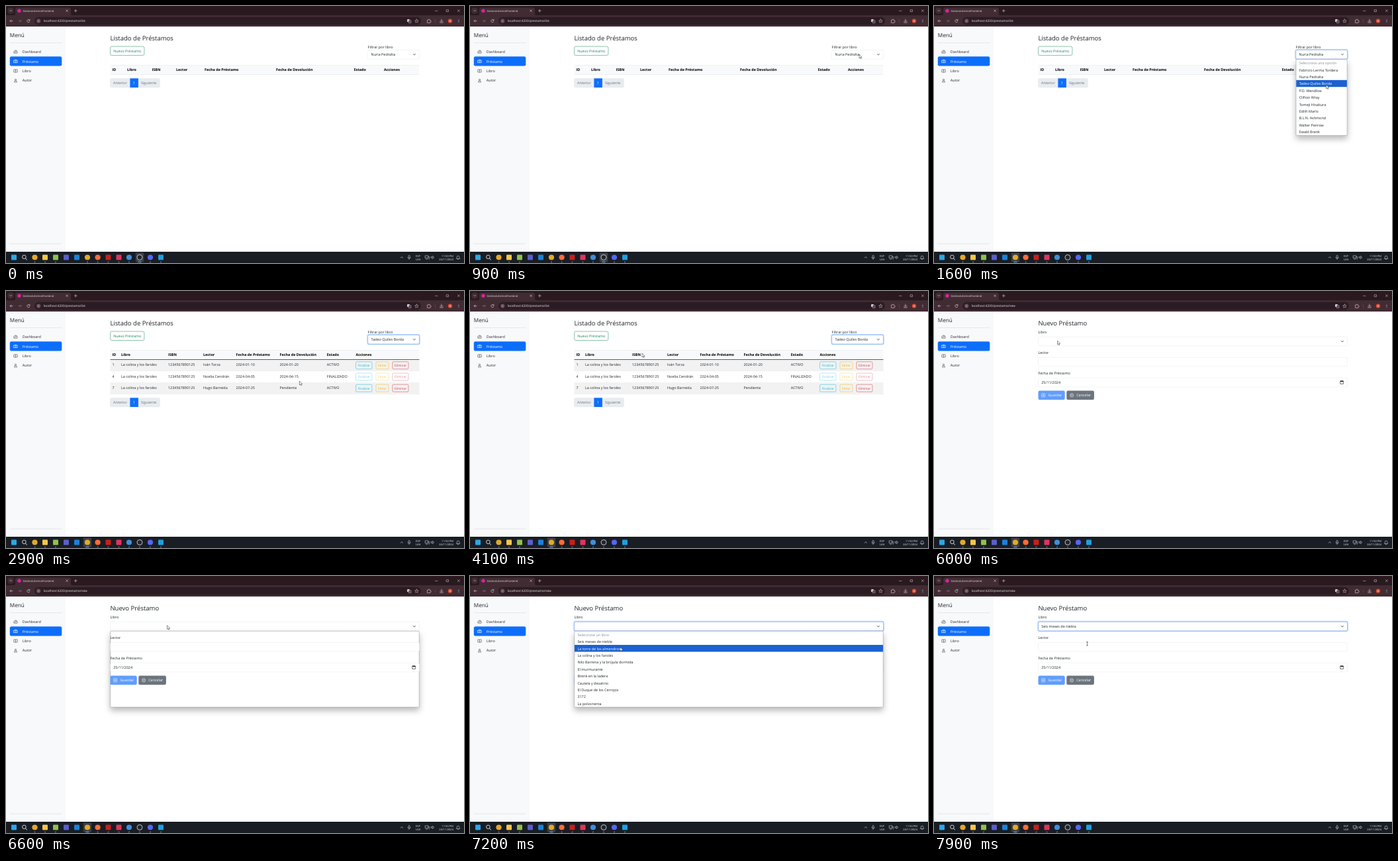
Recreate the animation shown at these times as an HTML page. Size 692x388 px, loop 8 s.

```html
<!DOCTYPE html>
<html lang="es">
<head>
<meta charset="utf-8">
<title>Préstamos</title>
<style>
html, body { margin: 0; width: 100%; height: 100%; overflow: hidden; background: #fff; }
svg { display: block; width: 100vw; height: 100vh; }
text { font-family: "Open Sans", "Noto Sans", sans-serif; text-rendering: geometricPrecision; white-space: pre; }
.shadow { filter: drop-shadow(0 5px 5px rgba(0, 0, 0, .28)); }
</style>
</head>
<body>
<svg id="stage" viewBox="0 0 692 388" xmlns="http://www.w3.org/2000/svg"></svg>
<script>
const LOOP = 8000, STEP = 100, ROW = 10.4;
const INK = '#212529', BLUE = '#0d6efd', GREY = '#6c757d', LINE = '#dee2e6', GREEN = '#198754';

// Pointer path: time, x, y
const PATH = [
  [0, 204, 392], [100, 204, 392], [900, 588, 73], [1100, 588, 73], [1600, 592.5, 119],
  [1900, 592.5, 119], [2700, 443.5, 136], [2900, 443.5, 136], [3700, 330, 118],
  [4500, 190, 70], [5100, 186.5, 73], [5600, 186.5, 73], [6000, 186.5, 75],
  [6100, 186.5, 75], [6600, 243.5, 74.5], [6700, 243.5, 74.5], [7000, 235, 117],
  [7200, 227, 107.5], [7700, 231.5, 102.3], [8000, 231.5, 102.3]
];

const AUTHORS = ['Selecciona una opción', 'Fabricio Lerma Tordera', 'Nuria Pedralta', 'Tadeo Quiles Borda',
  'P.D. Wendlow', 'Clifton Wray', 'Tomeji Hisakura', 'Edith Marlo', 'B.L.N. Ashmond', 'Walter Penrow', 'Ewald Brenk'];
const BOOKS = ['Seleccione un libro', 'Seis meses de niebla', 'La torre de los almendros', 'La colina y los faroles',
  'Nilo Barrena y la brújula dormida', 'El murmurante', 'Brenk en la ladera', 'Cautela y desatino',
  'El Duque de los Cerrojos', '3172', 'La polvorienta'];
const HEAD = ['ID', 'Libro', 'ISBN', 'Lector', 'Fecha de Préstamo', 'Fecha de Devolución', 'Estado', 'Acciones'];
const COLS_EMPTY = [160.5, 183, 220.5, 257, 300, 408, 525.7, 571];
const COLS_FULL = [160.5, 174, 245, 298, 347.6, 413.5, 484.8, 528.5];
const LOANS = [
  ['1', 'Iván Torza', '2024-01-10', '2024-01-20', 'ACTIVO'],
  ['4', 'Noelia Cendrán', '2024-04-05', '2024-04-15', 'FINALIZADO'],
  ['7', 'Hugo Barreida', '2024-07-25', 'Pendiente', 'ACTIVO']
];

const text = (x, y, s, { size = 5.45, fill = INK, weight = 400, anchor = 'start', id = '' } = {}) =>
  `<text ${id && `id="${id}"`} x="${x}" y="${y}" font-size="${size}" fill="${fill}" font-weight="${weight}" text-anchor="${anchor}">${s}</text>`;
const rect = (x, y, w, h, fill, more = '') =>
  `<rect x="${x}" y="${y}" width="${w}" height="${h}" fill="${fill}" ${more}/>`;
const disc = (x, y, r, fill, more = '') => `<circle cx="${x}" cy="${y}" r="${r}" fill="${fill}" ${more}/>`;
const path = (d, color, w = .6, more = '') =>
  `<path d="${d}" fill="none" stroke="${color}" stroke-width="${w}" stroke-linecap="round" stroke-linejoin="round" ${more}/>`;
const at = (x, y, s) => `<g transform="translate(${x} ${y})">${s}</g>`;
const group = (id, s) => `<g id="${id}">${s}</g>`;
const edge = (color, r = 2.2, w = .4) => `rx="${r}" stroke="${color}" stroke-width="${w}"`;

const chevron = (x, y) => path(`M${x - 1.7} ${y - .8}l1.7 1.7 1.7-1.7`, '#343a40', .75);
const field = (x, y, w) => rect(x, y, w, 13.6, '#fff', edge(LINE));
const focusRing = (id, x, y, w) => group(id,
  rect(x - .7, y - .7, w + 1.4, 15, 'none', edge('#b6d4fe', 2.8, 1.3)) + rect(x, y, w, 13.6, 'none', edge('#6ea3f5', 2.2, .5)));

function browser() {
  const c = '#e3d5da';
  const line = (d, w) => path(d, c, w);
  return rect(0, 0, 692, 14, '#2a1a20') + rect(0, 14, 692, 17, '#412c34') +
    rect(2.5, 2.5, 9, 9, '#412c34', 'rx="3"') + line('M5.8 6.4l1.4 1.4 1.4-1.4') +
    '<path d="M11.5 14.1q2.5 0 2.5-2.5v-6q0-3 3-3h78q3 0 3 3v6q0 2.5 2.5 2.5z" fill="#412c34"/>' +
    disc(20, 7.2, 2.7, '#d6249f') +
    text(25.5, 8.9, 'GestionLibreriaFrontend', { size: 4.1, fill: '#eee3e7' }) +
    line('M90.8 5.9l2.6 2.6m0-2.6l-2.6 2.6M103.3 7.2h3.8m-1.9-1.9v3.8') +
    line('M648.6 7.4h3.4M665.6 5.7h2.9v2.9h-2.9zM682.4 5.7l3 3m0-3l-3 3', .5) +
    line('M10.2 22.6H6.1m1.8-1.8l-1.8 1.8 1.8 1.8') + path('M18.9 22.6H23m-1.8-1.8l1.8 1.8-1.8 1.8', '#8f7a82') +
    line('M35.6 21.4a2.1 2.1 0 1 0 .3 1.9M35.9 20.2v1.5h-1.5') +
    rect(43, 16.7, 584, 11.8, '#2a1c22', 'rx="5.9"') + disc(49.2, 22.6, 4, '#412c34') +
    disc(49.2, 22.6, 1.9, 'none', `stroke="${c}" stroke-width=".5"`) + line('M49.2 22.4v1.1M49.2 21.5v.05', .5) +
    text(56.6, 24.3, 'localhost:4200/prestamo/list', { size: 4.77, fill: '#f1e8eb', id: 'url' }) +
    rect(606.2, 19.9, 3.6, 4.2, c, 'rx=".5"') + rect(608.3, 21.6, 3.8, 4.2, '#2a1c22', `stroke="${c}" stroke-width=".45" rx=".5"`) +
    line('M609.2 24.6l1-2 1 2', .4) +
    line('M620.5 20l.8 1.8 1.9.2-1.4 1.3.4 1.9-1.7-1-1.7 1 .4-1.9-1.4-1.3 1.9-.2z', .5) +
    line('M636.9 21.2h1.2q0-1.2.9-1.2t.9 1.2h1.2v1.3q1.2 0 1.2.9t-1.2.9v1.1h-4.2z') +
    rect(648.6, 20, .4, 5.2, '#7d636d') +
    line('M658 20v3.4m-1.5-1.5l1.5 1.5 1.5-1.5M655.8 23.8v1.3h4.4v-1.3') +
    disc(671, 22.6, 3.2, '#e5492f') + text(671, 24, 'B', { size: 3.6, fill: '#fff', anchor: 'middle' }) +
    [20.9, 22.6, 24.3].map(y => disc(684, y, .5, c)).join('');
}

function sidebar() {
  const gauge = c => path('M-2.6 1.6a2.8 2.8 0 1 1 5.2 0zM0 .5l1.3-1.6M-1.7.3h.3M0-1.3v.2', c, .55);
  const box = c => path('M-2.7-1.5h5.4v3.4h-5.4zM-1.5-1.5l.5-.9h2l.5.9', c, .6) + disc(0, .2, .9, 'none', `stroke="${c}" stroke-width=".5"`);
  const book = c => path('M0-1.7q-1.4-.9-2.7-.3v4q1.3-.6 2.7.2 1.4-.8 2.7-.2v-4q-1.3-.6-2.7.3zv3.8', c, .5);
  const person = c => disc(0, -1.1, 1.1, 'none', `stroke="${c}" stroke-width=".5"`) + path('M-2 2.2q0-1.9 2-1.9t2 1.9z', c, .5);
  const items = [['Dashboard', gauge], ['Préstamo', box], ['Libro', book], ['Autor', person]];
  return rect(0, 31, 90, 340, '#f8f9fa') + text(5.8, 47, 'Menú', { size: 8.17 }) +
    rect(5.8, 55.3, 78.5, .4, '#c6c9cc') + rect(5.8, 358.8, 78.5, .4, '#c6c9cc') +
    rect(5.8, 76.2, 78.5, 14.3, BLUE, 'rx="2.2"') +
    items.map(([name, icon], i) => {
      const y = 69.2 + i * 14.4, c = i === 1 ? '#fff' : INK;
      return at(14.5, y, icon(c)) + text(24.8, y + 1.9, name, { fill: c });
    }).join('');
}

function taskbar() {
  const c = '#e8eaed', mid = 379.5;
  const sq = (x, fill) => rect(x - 4, mid - 4, 8, 8, fill, 'rx="1"');
  const dot = (x, fill) => disc(x, mid, 4.1, fill);
  const open = [43.5, 59, 75, 123, 138.6, 154.5, 170.5, 186, 202, 218, 234];
  const tile = (id, x) => group(id, rect(x - 6.2, 372.4, 12.4, 14.2, '#3a3f47', 'rx="1.4"') + rect(x - 2.6, 386, 5.2, 1, '#66c5f2', 'rx=".5"'));
  return rect(0, 371, 692, 17, '#191d24') + tile('tileA', 202) + tile('tileB', 123) +
    open.map(x => rect(x - 1, 386.1, 2, .8, '#9aa0a8', 'rx=".4"')).join('') +
    sq(12, '#2aa8ea') +
    disc(27.4, 378.9, 2.8, 'none', `stroke="${c}" stroke-width=".9"`) + path('M29.6 381.2l2 2', c, 1) +
    dot(43.5, '#e3a92c') + sq(59, '#f4c84a') + sq(75, '#8fc24a') + sq(91, '#5b5fc7') + sq(107, '#1b82d6') +
    dot(123, '#e3a92c') + dot(138.6, '#ff6c37') + sq(154.5, '#c8201c') + sq(170.5, '#e0355c') +
    dot(186, '#3f8fdc') + disc(202, mid, 4, '#22252b', `stroke="${c}" stroke-width=".8"`) +
    dot(218, '#5865f2') + sq(234, '#1f9fe0') +
    path('M596.2 380.3l1.7-1.7 1.7 1.7', c) +
    rect(608.1, 376.4, 2, 3.8, 'none', edge(c, 1, .5)) + path('M607 379.3q0 2.1 2.1 2.1t2.1-2.1M609.1 381.4v1.3', c, .5) +
    ['ESP', 'LAA'].map((s, i) => text(622.6, 378.6 + i * 5.5, s, { size: 4.1, fill: c, anchor: 'middle' })).join('') +
    path('M633.6 377h4.4v3.6h-4.4zM634.6 382.3h2.4M638 378.6h1.4v3.6', c, .55) +
    path('M642.4 378.6h1l1.4-1.3v4.4l-1.4-1.3h-1zM646 378.4q.8 1.1 0 2.2', c, .5) +
    text(676, 378.6, '11:50 PM', { size: 4.1, fill: c, anchor: 'end' }) +
    text(676, 384.1, '24/11/2024', { size: 4.1, fill: c, anchor: 'end' }) +
    path('M680.6 381.3q.8-.7.8-2.4 0-1.8 1.7-1.8t1.7 1.8q0 1.7.8 2.4zM682.5 382.6h1.2', c, .55);
}

function menu(id, x, y, w, items) {
  return group(id, rect(x, y, w, 114.8, '#fff', `class="shadow" ${edge('#8b8f94', 1, .5)}`) +
    rect(x + .3, y, w - .6, ROW, '#1b62d2', `id="${id}Bar"`) +
    items.map((s, i) => text(x + 4.7, y + 7.6 + i * ROW, s, { id: id + i, fill: i ? INK : '#868b90' })).join(''));
}

function head(cols, divider) {
  return rect(157.5, 89.4, 467, 14.2, '#f8f9fa') + rect(157.5, 89.2, 467, .4, LINE) +
    HEAD.map((s, i) => text(cols[i], 98.3, s, { weight: 700, fill: '#000' })).join('') +
    rect(157.5, 103.2, 467, divider ? .8 : .5, divider ? INK : LINE);
}

function pager(y) {
  return rect(157.5, y, 75, 13.6, '#e9ecef', edge(LINE)) + rect(187.4, y - .1, 12.5, 13.8, BLUE) +
    text(162, y + 8.8, 'Anterior', { fill: GREY }) + text(193.6, y + 8.8, '1', { fill: '#fff', anchor: 'middle' }) +
    text(204, y + 8.8, 'Siguiente', { fill: GREY });
}

function loanRow([id, reader, from, to, state], i) {
  const y = 103.9 + i * 17.2, base = y + 9.4;
  const cells = [id, 'La colina y los faroles', '1234567890125', reader, from, to, state];
  const button = (x, w, s, color) => rect(x, y + 2.9, w, 11, 'none', edge(color, 1.5, .5)) +
    text(x + w / 2, y + 10.2, s, { size: 4.77, fill: color, anchor: 'middle' });
  return rect(157.5, y, 467, 17.2, i % 2 ? '#fff' : '#f2f2f2') + rect(157.5, y + 17, 467, .4, LINE) +
    cells.map((s, k) => text(COLS_FULL[k], base, s)).join('') +
    `<g opacity="${i === 1 ? .6 : 1}">` + button(528.6, 24.4, 'Finalizar', '#0dbbe0') +
    button(559, 19, 'Editar', '#f5b90a') + button(584, 24, 'Eliminar', '#dc3545') + '</g>';
}

const title = s => text(157.4, 52.4, s, { size: 9.54, weight: 500 });

const listPage = () => title('Listado de Préstamos') +
  rect(157.6, 61, 51.3, 13.5, '#fff', `id="newBtn" ${edge(GREEN, 2.2, .5)}`) +
  text(162.2, 69.7, 'Nuevo Préstamo', { fill: GREEN, id: 'newText' }) +
  text(546.6, 64.4, 'Filtrar por libro') + field(546.7, 66.4, 77.8) + focusRing('ringA', 546.7, 66.4, 77.8) +
  text(551.6, 75.2, '', { id: 'author' }) + chevron(617, 73.2) +
  group('empty', head(COLS_EMPTY, false) + pager(109.4)) +
  group('full', head(COLS_FULL, true) + LOANS.map(loanRow).join('') + pager(161.4)) +
  menu('menuA', 547, 80.6, 77.2, AUTHORS);

const newPage = () => title('Nuevo Préstamo') + text(157.4, 64.4, 'Libro') +
  field(157.6, 69.2, 467) + focusRing('ringB', 157.6, 69.2, 467) + text(162.2, 78, '', { id: 'book' }) + chevron(617, 76.1) +
  rect(157.7, 83.2, 466.6, 114.8, '#fff', `id="frame" class="shadow" ${edge('#8b8f94', 1, .5)}`) +
  text(157.4, 95.3, 'Lector') + field(157.6, 100.3, 467) +
  text(157.4, 126.2, 'Fecha de Préstamo') + field(157.6, 131.2, 467) + text(162.2, 139.9, '25/11/2024') +
  path('M614.2 136h4.2v4.3h-4.2zM615.1 135.3v.5M617.5 135.3v.5', '#111', .6) + rect(614.2, 135.8, 4.2, 1.2, '#111') +
  rect(157.5, 150.6, 40.2, 13.6, '#619dfd', 'rx="2.2"') + rect(200.3, 150.6, 41.6, 13.6, GREY, 'rx="2.2"') +
  rect(162.6, 154.8, 5.2, 5.2, 'none', edge('#fff', .8, .55)) + path('M165.2 156v2.8M163.8 157.4h2.8', '#fff', .55) +
  disc(208.1, 157.4, 2.6, 'none', 'stroke="#fff" stroke-width=".55"') + path('M207.1 156.4l2 2m0-2l-2 2', '#fff', .55) +
  text(172.4, 159.3, 'Guardar', { fill: '#fff' }) + text(215.2, 159.3, 'Cancelar', { fill: '#fff' }) +
  menu('menuB', 157.7, 83.2, 466.6, BOOKS);

const pointer = () => group('pointer',
  group('arrow', '<path d="M0 0v5.9l1.4-1.3.9 2.1.9-.4-.9-2h1.9z" fill="#fff" stroke="#111" stroke-width=".45" stroke-linejoin="round"/>') +
  group('hand', '<path d="M-.6.3q.6-.8 1.2 0v2.6l2.3.6q.8.3.7 1.2l-.6 2.8h-3.4l-2-2.9q-.2-1 .7-.7l1.1.8z" fill="#fff" stroke="#111" stroke-width=".45" stroke-linejoin="round"/>') +
  group('beam', path('M-1-2.8h.7q.3 0 .3.4v4.8q0 .4-.3.4H-1M1-2.8H.3q-.3 0-.3.4M1 2.8H.3q-.3 0-.3-.4', '#111', .5)));

const $ = id => document.getElementById(id);
$('stage').innerHTML = rect(0, 0, 692, 388, '#fff') + sidebar() + group('list', listPage()) +
  group('form', newPage()) + browser() + taskbar() + pointer();

const show = (id, on) => $(id).style.display = on ? '' : 'none';
const put = (id, s) => { if ($(id).textContent !== s) $(id).textContent = s; };

function pointerAt(t) {
  const i = Math.max(1, PATH.findIndex(p => p[0] > t));
  const [t0, x0, y0] = PATH[i - 1], [t1, x1, y1] = PATH[i];
  const k = (t - t0) / (t1 - t0), e = k * k * (3 - 2 * k);
  return [x0 + (x1 - x0) * e, y0 + (y1 - y0) * e];
}

function hover(id, top, y, idle, count) {
  const n = y < top ? idle : Math.floor((y - top) / ROW);
  show(id + 'Bar', n > 0);
  $(id + 'Bar').setAttribute('y', top + n * ROW);
  for (let i = 1; i < count; i++) $(id + i).setAttribute('fill', i === n ? '#fff' : INK);
}

function draw(ms) {
  const t = Math.floor(ms % LOOP / STEP) * STEP;
  const [x, y] = pointerAt(t);
  const form = t >= 5600, picked = t >= 1900, done = t >= 7900;
  const over = !form && x > 157 && x < 209 && y > 61 && y < 74.5;

  show('list', !form);
  show('form', form);
  put('url', 'localhost:4200/prestamo/' + (form ? 'new' : 'list'));
  show('tileA', t < 1000);
  show('tileB', t >= 1000);

  show('empty', !picked);
  show('full', picked);
  put('author', AUTHORS[picked ? 3 : 2]);
  show('ringA', t >= 1100);
  show('menuA', t >= 1100 && !picked);
  hover('menuA', 80.6, y, 2, AUTHORS.length);
  $('newBtn').setAttribute('fill', over ? GREEN : '#fff');
  $('newText').setAttribute('fill', over ? '#fff' : GREEN);

  show('frame', t === 6600);
  show('menuB', t >= 6700 && !done);
  show('ringB', t >= 6700);
  put('book', done ? BOOKS[1] : '');
  hover('menuB', 83.2, y, -1, BOOKS.length);

  $('pointer').setAttribute('transform', `translate(${x} ${y})`);
  show('arrow', !over && !done);
  show('hand', over);
  show('beam', done);
}

function tick() {
  draw(performance.now());
  requestAnimationFrame(tick);
}
tick();
</script>
</body>
</html>
```
